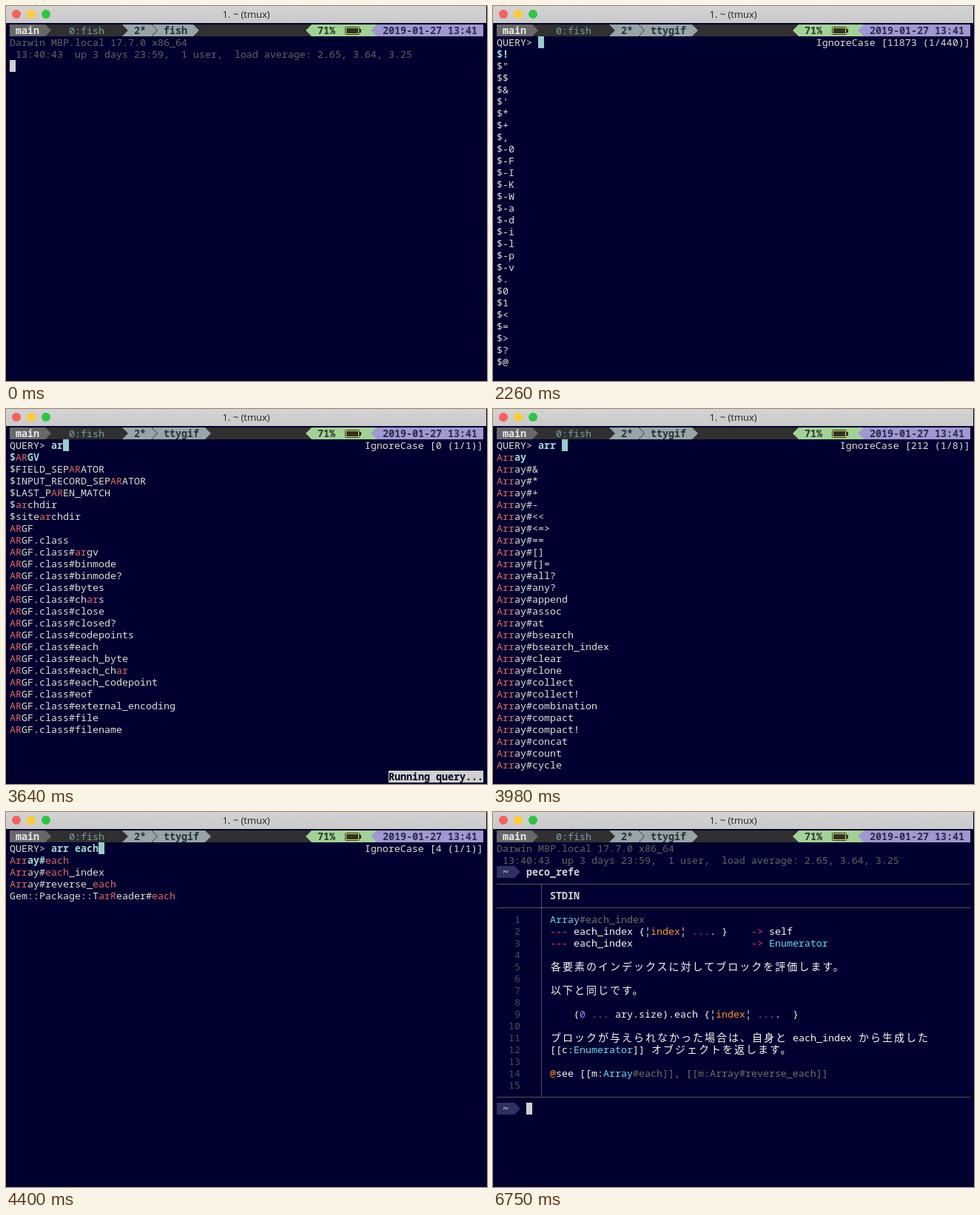
These frames come from a looping animation (650 px wide and 507 px high, 7910 ms). An HTML page:

```html
<!DOCTYPE html>
<html lang="en">
<head>
<meta charset="utf-8">
<title>Terminal</title>
<style>
html, body { margin: 0; width: 100%; height: 100%; overflow: hidden; background: #000030; }
#stage { position: relative; width: 650px; height: 507px; overflow: hidden; background: #000030; }
#title { position: absolute; left: 0; top: 0; width: 649px; height: 23px; background: linear-gradient(#d3d3d3, #cacaca);
  font: 13px/23px "Open Sans", "Noto Sans", sans-serif; text-align: center; color: #222; }
#title i { position: absolute; top: 5px; width: 12px; height: 12px; border-radius: 50%; }
#bar, pre, #msg { font: 13.3333px/16px "Noto Sans Mono", "DejaVu Sans Mono", monospace; white-space: pre; margin: 0; }
#bar { position: absolute; left: 5px; top: 25px; width: 640px; height: 16px; background: #303030;
  display: flex; font-weight: bold; }
pre { position: absolute; left: 5px; top: 41px; width: 640px; color: #e0e0d0; }
pre i { font: 14px/0 "Noto Sans CJK JP", "Noto Sans CJK", sans-serif; letter-spacing: 2px; position: relative; left: 1px; }
.blk { display: inline-block; height: 16px; vertical-align: top; }
.tip { display: inline-block; width: 8px; height: 16px; vertical-align: top; background: currentColor;
  clip-path: polygon(0 0, 100% 50%, 0 100%); }
.left { clip-path: polygon(100% 0, 0 50%, 100% 100%); }
.main { background: #686868; color: #e8e8e8; }
.win { color: #78a0a4; font-weight: normal; }
.tab { background: #98a4a5; color: #203438; }
.bat { background: #a2d296; color: #2c3828; }
.day { background: #a098d0; color: #2a2a4c; }
.prompt { background: #303060; color: #c8c8b8; font-weight: bold; }
.cur { background: #d0d0d0; color: #000030; min-width: 8px; }
.pcur { background: #98cccc; width: 8px; }
.dim { color: #60665a; }
.cmd { color: #d4d4d4; font-weight: bold; }
.bad { color: #f0644c; font-weight: bold; }
.sel { color: #a4d8d4; font-weight: bold; }
.hit { color: #e0695a; }
.num { color: #4c4d4a; }
.code { color: #f8f8f2; }
.type { color: #66d9ef; }
.op { color: #ee3c5c; }
.arg { color: #fd971f; }
.lit { color: #ae81ff; }
.note { color: #75715e; }
#msg { position: absolute; right: 5px; top: 489px; height: 16px; background: #d0d0d0; color: #000020; font-weight: bold; }
svg { display: block; }
#rules { position: absolute; left: 0; top: 0; }
</style>
</head>
<body>
<div id="stage">
  <div id="title"><i style="left:8px;background:#f9605a"></i><i style="left:28px;background:#fdcc30"></i><i style="left:48px;background:#2ac840"></i>1. ~ (tmux)</div>
  <div id="bar"><span class="main"> main </span><span class="tip" style="color:#686868"></span><span class="win">   0:fish   </span><span class="tab" style="width:8px"><span class="tip" style="color:#303030"></span></span><span class="tab"> 2* </span><span class="tab"><svg width="8" height="16"><path d="M0 0L7.5 8L0 16" fill="none" stroke="#303c40"/></svg></span><span class="tab" id="tab"> fish </span><span class="tip" style="color:#98a4a5"></span><span class="tip left" style="color:#a2d296;margin-left:auto"></span><span class="bat"> 71% </span><span class="bat"><svg width="40" height="16"><rect x="5.5" y="3.5" width="19" height="10" rx="1" fill="#d8dc70" stroke="#303420"/><rect x="7" y="5" width="16" height="7" fill="#303420"/><path d="M25 6h2v5h-2z" fill="#303420"/></svg></span><span class="bat" style="width:8px"><span class="tip left" style="color:#a098d0"></span></span><span class="day"> 2019-01-27 13:41 </span></div>
  <div id="screen"></div>
</div>
<script>
const LOOP = 7910;
const esc = s => s.replace(/&/g, '&amp;').replace(/</g, '&lt;').replace(/>/g, '&gt;');
const span = (cls, s) => `<span class="${cls}">${esc(s)}</span>`;
const page = (lines, extra = '') => `<pre>${lines.join('\n')}</pre>${extra}`;

// Shell
const CMD = 'peco_refe';
const head = [span('dim', 'Darwin MBP.local 17.7.0 x86_64'),
  span('dim', ' 13:40:43  up 3 days 23:59,  1 user,  load average: 2.65, 3.64, 3.25')];
const prompt = span('blk prompt', ' ~ ') + '<span class="tip" style="color:#303060"></span> ';
const cursor = (c = ' ') => span('blk cur', c);
const shell = (...lines) => page([...head, ...lines]);

function typed(n) {
  const known = n === 4 || n === 9;
  return shell(prompt + span(known ? 'cmd' : 'bad', CMD.slice(0, n)) +
    cursor(CMD[n]) + span('dim', CMD.slice(n + 1)));
}
const entered = prompt + span('cmd', CMD);

// Filter list
function mark(text, terms, picked) {
  const parts = terms.length ? text.split(new RegExp(`(${terms.join('|')})`, 'i' + 'g')) : [text];
  return parts.map((p, i) => i % 2 ? span('hit', p) : picked ? span('sel', p) : esc(p)).join('');
}

function peco(query, list, count, msg = '', pick = 0) {
  const terms = query.split(' ').filter(Boolean);
  const info = `IgnoreCase [${count}]`;
  const top = 'QUERY> ' + span('sel', query) + '<span class="blk pcur"></span>' +
    ' '.repeat(72 - query.length - info.length) + info;
  return page([top, ...list.map((s, i) => mark(s, terms, i === pick))],
    msg && `<div id="msg">${msg}</div>`);
}

const words = (s, pre = '') => s.split(' ').map(w => pre + w);
const all = words('! " $ & \' * + , -0 -F -I -K -W -a -d -i -l -p -v . 0 1 < = > ? @', '$');
const ar = [...words('ARGV FIELD_SEPARATOR INPUT_RECORD_SEPARATOR LAST_PAREN_MATCH archdir sitearchdir', '$'),
  'ARGF', 'ARGF.class',
  ...words('argv binmode binmode? bytes chars close closed? codepoints each each_byte each_char each_codepoint eof external_encoding file filename', 'ARGF.class#')];
const arMore = [...ar, ...words('fileno getc gets', 'ARGF.class#')];
const a = [...words('-a ARGV CHILD_STATUS DEFAULT_INPUT DEFAULT_OUTPUT FIELD_SEPARATOR FILENAME INPUT_RECORD_SEPARATOR LAST_MATCH_INFO LAST_PAREN_MATCH LAST_READ_LINE LOADED_FEATURES LOAD_PATH MATCH', '$'),
  ...ar.slice(4, 17)];
const arr = ['Array', ...words('& * + - << <=> == [] []= all? any? append assoc at bsearch bsearch_index clear clone collect collect! combination compact compact! concat count cycle', 'Array#')];
const arrE = words('bsearch bsearch_index clear clone collect collect! delete delete_at delete_if each each_index empty? eql? fetch first flatten freeze include? index insert inspect keep_if length permutation product repeated_combination repeated_permutation', 'Array#');
const arrEa = words('bsearch bsearch_index clear each each_index repeated_combination repeated_permutation reverse_each', 'Array#');
const tar = 'Gem::Package::TarReader';
const arrEach = [...words('each each_index reverse_each', 'Array#'), tar + '#each'];
const arrEaMore = [...arrEa, tar, ...words('close each rewind', tar + '#')];
const RUN = 'Running query...';

// Document view: {class|text} switches colour, plain text stays white
const tint = s => s.split(/\{(\w+)\|([^}]*)\}/)
  .map((p, i) => i % 3 === 1 ? `<span class="${p}">` : i % 3 === 2 ? esc(p) + '</span>' : esc(p))
  .join('').replace(/[\u3000-\u9fff]+/g, '<i>$&</i>');
const doc = [
  '{type|Array}{note|#each_index}',
  '{op|---} each_index {¦{arg|index}¦ {op|...}. }    {op|->} self',
  '{op|---} each_index                    {op|->} {type|Enumerator}',
  '',
  '各要素のインデックスに対してブロックを評価します。',
  '',
  '以下と同じです。',
  '',
  '    ({lit|0} {op|...} ary.size).each {¦{arg|index}¦ {op|...}.  }',
  '',
  'ブロックが与えられなかった場合は、自身と each_index から生成した',
  '[[c:{type|Enumerator}]] オブジェクトを返します。',
  '',
  '{arg|@}see [[m:{type|Array}{note|#each]], [[m:Array#reverse_each]]}',
  ''
].map((s, i) => span('num', String(i + 1).padStart(4)) + '     ' + `<span class="code">${tint(s)}</span>`);
const rules = '<svg id="rules" width="650" height="507"><path d="M5 97.5H645M5 129.5H645M5 385.5H645M65.5 97V385" fill="none" stroke="#55564e"/></svg>';
const view = last => page([...head, entered, '', ' '.repeat(9) + span('cmd', 'STDIN'), '', ...doc, '', last], rules);

const steps = [
  [0, shell(cursor())],
  [60, shell(prompt + cursor())],
  ...[1090, 1130, 1220, 1320, 1560, 1740, 1810, 1880, 1950].map((t, i) => [t, typed(i + 1)]),
  [2140, shell(entered, cursor())],
  [2200, peco('', [], '0 (1/1)')],
  [2260, peco('', all, '11873 (1/440)')],
  [3460, peco('a', all, '11873 (1/440)')],
  [3490, peco('a', a.slice(0, 12), '0 (1/1)', RUN)],
  [3520, peco('a', a, '0 (1/1)', RUN)],
  [3560, peco('ar', a, '0 (1/1)', RUN)],
  [3600, peco('ar', ar.slice(0, 8), '0 (1/1)', RUN)],
  [3640, peco('ar', ar, '0 (1/1)', RUN)],
  [3670, peco('ar', arMore, '0 (1/1)', RUN)],
  [3710, peco('arr', arr, '0 (1/1)', RUN)],
  [3750, peco('arr', arr, '212 (1/8)')],
  [3980, peco('arr ', arr, '212 (1/8)')],
  [4010, peco('arr ', arr, '212 (1/8)', RUN)],
  [4050, peco('arr e', arr, '212 (1/8)', RUN)],
  [4080, peco('arr e', arrE, '112 (1/5)', RUN)],
  [4110, peco('arr ea', arrE, '112 (1/5)', RUN)],
  [4130, peco('arr ea', arrEa.slice(0, 5), '8 (1/1)', RUN)],
  [4150, peco('arr ea', arrEa, '8 (1/1)', RUN)],
  [4170, peco('arr ea', arrEaMore, '12 (1/1)', RUN)],
  [4210, peco('arr ea', arrEaMore, '12 (1/1)')],
  [4250, peco('arr eac', arrEaMore, '12 (1/1)', RUN)],
  [4280, peco('arr eac', arrEach, '4 (1/1)', RUN)],
  [4320, peco('arr each', arrEach, '4 (1/1)')],
  [4350, peco('arr each', arrEach, '4 (1/1)', RUN)],
  [4400, peco('arr each', arrEach, '4 (1/1)')],
  [5160, peco('arr each', arrEach, '4 (1/1)', 'C-n', 1)],
  [5490, peco('arr each', arrEach, '4 (1/1)', '', 1)],
  [6150, shell(entered, cursor())],
  [6710, view(cursor())],
  [6750, view(prompt + cursor())]
];

const screenBox = document.getElementById('screen');
const tab = document.getElementById('tab');
let shown = -1;
const start = performance.now();

function draw() {
  const t = (performance.now() - start) % LOOP;
  let i = steps.length - 1;
  while (steps[i][0] > t) i--;
  if (i !== shown) {
    shown = i;
    screenBox.innerHTML = steps[i][1];
    tab.textContent = steps[i][0] < 1090 ? ' fish ' : ' ttygif ';
  }
  requestAnimationFrame(draw);
}
draw();
</script>
</body>
</html>
```
